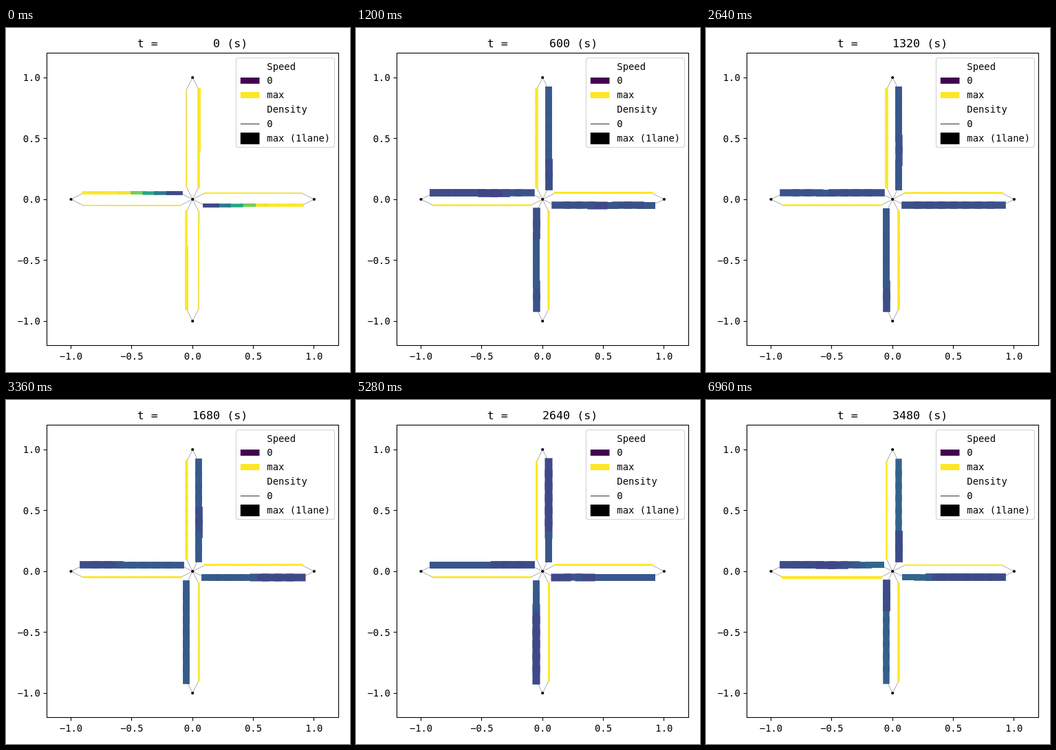
These frames come from a looping animation (500 by 500 pixels, 7.2 s). An HTML page with a canvas:

```html
<!DOCTYPE html>
<html lang="en">
<head>
<meta charset="utf-8">
<title>Crossroads traffic</title>
<style>
  html, body { margin: 0; width: 100%; height: 100%; overflow: hidden; background: #fff; }
  canvas { display: block; width: 500px; height: 500px; }
</style>
</head>
<body>
<canvas id="stage" width="500" height="500"></canvas>
<script>
const ctx = document.getElementById('stage').getContext('2d');
const STEP = 240, STEPS = 30, CELLS = 8;
const FONT = '"DejaVu Sans Mono", monospace';
const px = x => 271.2 + x * 176.7;
const py = y => 249 - y * 177;
const lerp = (a, b, k) => a + (b - a) * k;
const clamp = (v, lo, hi) => Math.min(hi, Math.max(lo, v));

const VIRIDIS = ['#440154', '#482475', '#414487', '#355f8d', '#2a788e', '#21918c',
  '#22a884', '#44bf70', '#7ad151', '#bddf26', '#fde725']
  .map(hex => [1, 3, 5].map(i => parseInt(hex.slice(i, i + 2), 16)));

function speedColor(v) {
  const pos = clamp(v, 0, 1) * 10, i = Math.min(9, Math.floor(pos));
  return `rgb(${VIRIDIS[i].map((c, j) => Math.round(lerp(c, VIRIDIS[i + 1][j], pos - i)))})`;
}

// Speed profiles along an approach; cell 0 is the outer end, cell 7 the junction.
const free = () => 1;
const queue = i => clamp(0.22 + (7 - i) * 0.19, 0, 1);
const steady = (v = 0.28) => () => v;
const band = (from, to, slow = 0.215, rest = 0.28) => i => i >= from && i <= to ? slow : rest;
const steps = (...levels) => i => levels[Math.min(levels.length - 1, i)];

// Approaches are listed west, east, north, south; exits likewise, as line widths.
const KEYS = [
  { at: 0, speed: [queue, queue, free, free], exits: [1.7, 2, 1.9, 2.1] },
  { at: 1, speed: [steady(0.26), steady(0.26), queue, queue], exits: [2, 2.5, 2.8, 2.2] },
  { at: 3, speed: [band(0, 5, 0.2), steps(0.27, 0.23, 0.23, 0.27, 0.23, 0.28),
      band(6, 7, 0.21), band(6, 7, 0.22)], exits: [2.5, 3.6, 4, 2.2] },
  { at: 8, speed: [band(4, 7, 0.2, 0.27), band(4, 7, 0.2, 0.27), steady(0.27),
      band(0, 1, 0.2, 0.27)], exits: [2, 2, 5, 5] },
  { at: 14, speed: [band(0, 2, 0.235), band(0, 3, 0.22), band(4, 5, 0.235), steady()],
    exits: [2.8, 2.8, 4.2, 2.6] },
  { at: 18, speed: [steps(0.27, 0.24, 0.27, 0.23, 0.23, 0.25, 0.27),
      steps(0.27, 0.24, 0.2), band(0, 2, 0.21, 0.27), steady(0.27)],
    exits: [4, 2.6, 2.5, 2.7] },
  { at: 22, speed: [band(5, 7, 0.23, 0.27), steps(0.27, 0.27, 0.27, 0.27, 0.27, 0.22, 0.26, 0.22),
      band(0, 5, 0.22, 0.27), band(0, 5, 0.22)], exits: [2.6, 2.6, 3, 3] },
  { at: 29, speed: [steps(0.23, 0.23, 0.23, 0.21, 0.21, 0.25, 0.29, 0.33),
      steps(0.23, 0.23, 0.23, 0.23, 0.23, 0.23, 0.3, 0.33),
      band(6, 7, 0.23, 0.31), band(6, 7, 0.23, 0.3)], exits: [4, 2, 2.6, 3.5] }
];

const ARMS = [[-1, 0], [1, 0], [0, 1], [0, -1]];

// Point on the left-hand carriageway, d units from the junction.
function lanePoint([ax, ay], d, inbound) {
  const side = inbound ? 0.05 : -0.05;
  return [px(ax * d + ay * side), py(ay * d - ax * side)];
}

function line(points, width, color, cap = 'butt') {
  ctx.beginPath();
  points.forEach(p => ctx.lineTo(p[0], p[1]));
  ctx.lineWidth = width;
  ctx.strokeStyle = color;
  ctx.lineCap = cap;
  ctx.stroke();
}

function cell(a, b, width, color) {
  const odd = Math.ceil(width) % 2 / 2;
  const snap = ([x, y]) => [Math.round(x) + odd, Math.round(y) - odd];
  line([snap(a), snap(b)], width, color, 'square');
}

function text(str, x, y, size = 13.89, align = 'left') {
  ctx.font = `${size}px ${FONT}`;
  ctx.textAlign = align;
  ctx.fillStyle = '#000';
  ctx.fillText(str, x, y);
}

function drawAxes() {
  ctx.lineWidth = 1.1;
  ctx.strokeStyle = '#000';
  ctx.strokeRect(59.5, 36.5, 424, 425);
  for (let v = -1; v <= 1; v += 0.5) {
    const label = v.toFixed(1).replace('-', '\u2212');
    const x = Math.floor(px(v)) + 0.5, y = Math.floor(py(v)) + 0.5;
    line([[x, 461.5], [x, 466.4]], 1.1, '#000');
    line([[59.5, y], [54.6, y]], 1.1, '#000');
    text(label, px(v), 482, 13.89, 'center');
    text(label, 49.8, py(v) + 5, 13.89, 'right');
  }
}

function approachWidth(n, arm, i, v) {
  if (n > 0) return 20.8 / (4 * v + 1);
  return arm < 2 ? 4.6 + (1 - v) * 1.6 : i < 5 ? 4.9 : 3.7;
}

function drawRoads(n) {
  const next = Math.max(1, KEYS.findIndex(key => key.at >= n));
  const a = KEYS[next - 1], b = KEYS[next];
  const k = (n - a.at) / (b.at - a.at);

  ARMS.forEach((arm, r) => {
    const node = [px(arm[0]), py(arm[1])], hub = [px(0), py(0)];
    for (const inbound of [true, false]) {
      line([node, lanePoint(arm, 0.9, inbound), lanePoint(arm, 0.1, inbound), hub], 0.35, '#000');
    }
    const exit = lerp(a.exits[r], b.exits[r], k);
    for (let i = 0; i < CELLS; i++) {
      const v = lerp(a.speed[r](i), b.speed[r](i), k);
      const d = 0.9 - i * 0.1, e = 0.1 + i * 0.1;
      cell(lanePoint(arm, d, true), lanePoint(arm, d - 0.1, true),
        approachWidth(n, r, i, v), speedColor(v));
      cell(lanePoint(arm, e, false), lanePoint(arm, e + 0.1, false),
        n ? exit : exit - i * 0.11, speedColor(1));
    }
  });

  ctx.fillStyle = '#000';
  for (const [x, y] of [[0, 0], ...ARMS]) {
    ctx.beginPath();
    ctx.arc(px(x), py(y), 2.1, 0, Math.PI * 2);
    ctx.fill();
  }
}

function drawLegend() {
  ctx.beginPath();
  ctx.roundRect(334.5, 43.5, 143, 130, 3);
  ctx.fillStyle = 'rgba(255,255,255,0.8)';
  ctx.fill();
  ctx.lineWidth = 1.2;
  ctx.strokeStyle = '#d4d4d4';
  ctx.stroke();
  const rows = [['Speed'], ['0', 9, speedColor(0)], ['max', 9, speedColor(1)],
    ['Density'], ['0', 0.8, '#000'], ['max (1lane)', 17, '#000']];
  rows.forEach(([label, width, color], i) => {
    const y = Math.round(55.5 + i * 20.9);
    if (width) line([[340.8, y + 0.5], [368.5, y + 0.5]], width, color);
    text(label, 379.3, y + 4.5);
  });
}

function render(now) {
  const n = Math.floor(now / STEP) % STEPS;
  ctx.fillStyle = '#fff';
  ctx.fillRect(0, 0, 500, 500);
  drawAxes();
  drawRoads(n);
  drawLegend();
  text(`t = ${String(n * 120).padStart(8)} (s)`, 190.8, 28, 16.67);
}

const start = performance.now();
function tick() {
  render(performance.now() - start);
  requestAnimationFrame(tick);
}
tick();
</script>
</body>
</html>
```
